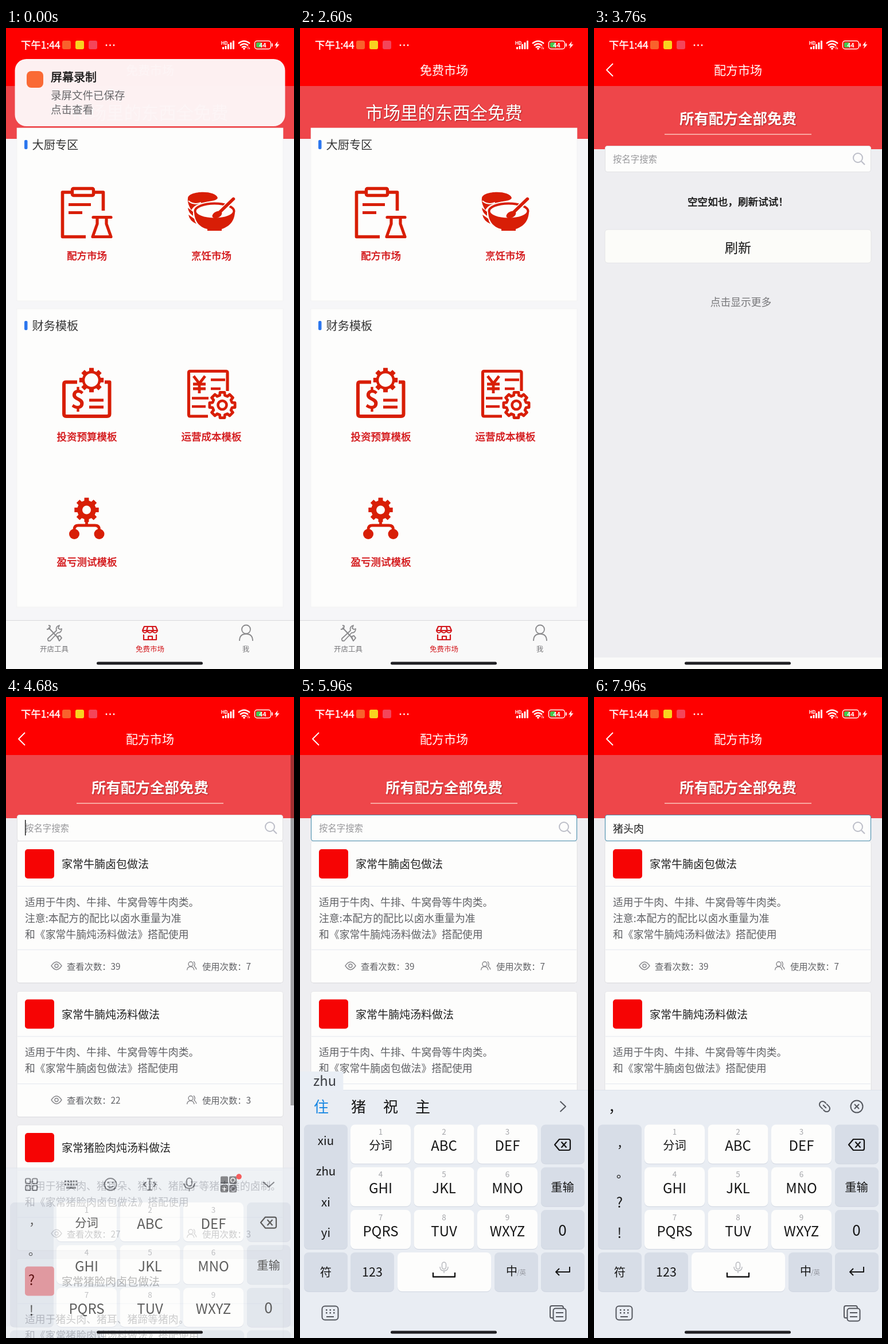
Write an HTML page that moves like this. It is 502x1116 px and loops after 8000 ms.

```html
<!DOCTYPE html>
<html lang="zh-CN">
<head>
<meta charset="utf-8">
<title>免费市场</title>
<style>
html, body { margin: 0; width: 100%; height: 100%; overflow: hidden; background: #fdfdfd; }
svg { display: block; width: 502px; height: 1116px; }
text { font-family: "Noto Sans CJK SC", "Noto Sans CJK", "Noto Sans", sans-serif; white-space: pre; }
</style>
</head>
<body>
<svg id="stage" viewBox="0 0 502 1116" xmlns="http://www.w3.org/2000/svg"></svg>
<script>
const RED = '#d81e06', LABEL = '#d20f12', GREY = '#5f6064', PAPER = '#fdfdfc';

// Drawing helpers
const text = (x, y, size, str, fill = '#222', more = '') =>
  `<text x="${x}" y="${y + .6}" font-size="${size}" fill="${fill}" ${more}>${str}</text>`;
const mid = (x, y, size, str, fill, more = '') => text(x, y, size, str, fill, `text-anchor="middle" ${more}`);
const medium = color => `stroke="${color}" stroke-width=".45"`;
const box = (x, y, w, h, fill, r = 0, more = '') =>
  `<rect x="${x}" y="${y}" width="${w}" height="${h}" rx="${r}" fill="${fill}" ${more}/>`;
const dot = (x, y, r, fill, more = '') => `<circle cx="${x}" cy="${y}" r="${r}" fill="${fill}" ${more}/>`;
const line = (d, color, w = 2, more = '') =>
  `<path d="${d}" fill="none" stroke="${color}" stroke-width="${w}" stroke-linejoin="round" ${more}/>`;
const fill = (d, color) => `<path d="${d}" fill="${color}"/>`;
const group = (id, body, more = '') => `<g id="${id}" ${more}>${body}</g>`;
const round = 'stroke-linecap="round"';

function gear(cx, cy, inner, outer, n = 8) {
  const pts = [], step = Math.PI * 2 / n;
  for (let i = 0; i < n; i++) {
    const a = i * step - Math.PI / 2;
    for (const [k, r] of [[-.32, inner], [-.23, outer], [.23, outer], [.32, inner]])
      pts.push((cx + r * Math.cos(a + k * step)).toFixed(1) + ' ' + (cy + r * Math.sin(a + k * step)).toFixed(1));
  }
  return 'M' + pts.join('L') + 'Z';
}

// Status bar
function statusBar() {
  const bars = [4, 6, 9, 12, 15].map((h, i) => box(377 + i * 4.5, 37 - h, 3, h, '#fff', 1)).join('');
  return text(26, 35.5, 17.4, '下午1:44', '#fff', medium('#fff'))
    + box(98, 22, 15, 15, '#f9622c', 3) + box(121, 22, 15, 15, '#f8d320', 3) + box(144, 22, 15, 15, '#f4455a', 3)
    + [175, 181.5, 188].map(x => dot(x, 30, 1.4, '#fff')).join('')
    + text(375, 28, 8, 'HD', '#fff', medium('#fff')) + bars
    + line('M405 27Q415 18.500 425 27M408 30.500Q415 24.500 422 30.500M411 34Q415 30.500 419 34', '#fff', 2.4)
    + dot(415, 36, 1.8, '#fff') + line('M422 32V37M424.500 34V37', '#fff', 1)
    + box(433.5, 22.5, 28, 14, 'none', 4, 'stroke="#fff" stroke-width="1.4"')
    + box(436, 25, 10, 9, '#43c84f', 2) + box(463, 26.5, 1.8, 6, '#fff', 1)
    + mid(447.5, 33, 10.5, '44', '#fff', 'font-weight="700"')
    + fill('M474 23L468 30.500H471.500L470 36L476.500 28.500H472.500Z', '#fff');
}

// Home page
const iconClipboard =
  line('M113 286H98.500V363.500H139M155 286H169.500V318', RED, 5.6)
  + box(115.5, 279.5, 37, 12, 'none', 2, `stroke="${RED}" stroke-width="5.400"`)
  + line('M109 307.500H148M109 321.500H133', RED, 5)
  + line('M152 329.500H183M159 330V341L151 363.500H183L175 341V330', RED, 5.2, round);

const iconBowl =
  fill('M317 296C319 283 366 282 369 296C366 302 352 301 340 305C330 308 326 312 323 317C319 310 316 304 317 296Z', RED)
  + line('M318 301Q327 309 340 304', PAPER, 2)
  + fill('M317 313L326 320V327Q318 322 317 313ZM318 325L328 332Q329 337 332 341Q320 336 318 325Z', RED)
  + fill('M328 319C328 340 341 348 351 350V353H376V350C389 346 399 336 399 319Z', RED)
  + `<ellipse cx="363.5" cy="319" rx="34" ry="13.500" fill="${PAPER}" stroke="${RED}" stroke-width="4"/>`
  + line('M397 297L371 323', PAPER, 9, round) + line('M396.500 297.500L370 323', RED, 5.4, round)
  + `<ellipse cx="368" cy="325" rx="9" ry="5.500" fill="${RED}" transform="rotate(-25 368 325)"/>`;

const iconBudget =
  line('M124 616.500H104Q101 616.500 101 620V672Q101 676 105 676H176Q180.500 676 180.500 672V616.500H172', RED, 6)
  + fill(gear(149, 613, 16.5, 21.5), RED) + dot(149, 613, 11.8, PAPER)
  + mid(125.5, 661.5, 44, '$', RED, 'font-weight="700"')
  + line('M145 648H170M145 660H170', RED, 5);

const iconCost =
  line('M352 676H321Q318.500 676 318.500 673V600Q318.500 597.500 321 597.500H383Q386 597.500 386 600V632', RED, 5.2)
  + line('M327 606L337 619L347 606M337 619V636M326 620H348M326 628H348', RED, 4.8)
  + line('M357 612.500H382M357 628H374M324 644.500H353M324 659H348', RED, 4.6)
  + `<path d="${gear(377, 656.5, 17.5, 22.5)}" fill="${PAPER}" stroke="${RED}" stroke-width="4.800" stroke-linejoin="round"/>`
  + dot(377, 656.5, 7.5, 'none', `stroke="${RED}" stroke-width="4.600"`);

const iconTest =
  fill(gear(140.5, 839, 16.5, 21.5), RED) + dot(140.5, 839, 7.5, PAPER)
  + line('M140.500 856V866M119 880V873Q119 866 126 866H155Q162.500 866 162.500 873V880', RED, 4.8)
  + dot(119, 881, 9, RED) + dot(162.5, 881, 9, RED);

function section(y, h, title) {
  return box(19, y, 464, h, PAPER, 0, 'stroke="#eeeeef" stroke-width=".6"')
    + box(32, y + 21, 5.5, 16, '#2b76ee', 2) + text(45.5, y + 36, 20.2, title, '#333');
}

function tabBar() {
  const grey = '#8a8a8c';
  return box(0, 1031, 502, 85, '#f9f9f9') + box(0, 1031, 502, 1, '#d9d9dc')
    + line('M74 1044L92 1063M71 1047L76 1046L77 1041L74 1040M89 1060L94 1058L97 1062L93 1067Z', grey, 2)
    + line('M73 1063L88 1049Q86 1042 93 1040L91 1045L94 1047L97 1046Q97 1053 90 1053L77 1067Q72 1068 73 1063Z', grey, 1.8)
    + line('M241 1042H261L264 1049H238ZM238 1050Q242 1056 246 1050Q251 1056 255 1050Q260 1056 264 1050M240 1056V1065H262V1056M248 1065V1059H255V1065M247 1042L245 1050M255 1042L257 1050', '#d3161b', 2.2)
    + dot(418.5, 1047, 7.5, 'none', `stroke="${grey}" stroke-width="1.800"`)
    + line('M407 1067Q407 1055 418.500 1055Q430 1055 430 1067', grey, 1.8)
    + mid(84, 1085, 12.5, '开店工具', '#77777a') + mid(251, 1085, 12.5, '免费市场', '#d3161b')
    + mid(418, 1085, 12.5, '我', '#77777a');
}

const label = (x, y, str) => mid(x, y, 17.5, str, LABEL, medium(LABEL));
const header = (title, bandEnd) =>
  box(0, 101, 502, bandEnd - 101, '#ee464a') + box(0, 0, 502, 101, '#fe0000') + mid(251, 80.5, 21, title, '#fff');
const shade = 'style="text-shadow:1px 1px 2px #a22"';

const home = box(0, 0, 502, 1116, '#f6f6f8') + header('免费市场', 193)
  + mid(251, 158, 30.4, '市场里的东西全免费', '#fff', shade)
  + section(174, 301, '大厨专区') + section(489, 519, '财务模板')
  + iconClipboard + iconBowl + iconBudget + iconCost + iconTest
  + label(141, 402, '配方市场') + label(358, 402, '烹饪市场')
  + label(141, 717, '投资预算模板') + label(358, 717, '运营成本模板') + label(141, 935, '盈亏测试模板')
  + tabBar();

// Recipe page
function card(y, title, lines, views, uses) {
  const foot = y + 133 + (lines.length - 2) * 28 + 27.5, base = foot + 34.5, height = foot - y + 58;
  const rule = v => box(20, v, 462, 1, '#e4e8f0');
  return box(18.5, y + 1, 465, height, '#dcdce0', 5)
    + box(19, y, 464, height, PAPER, 4, 'stroke="#e2e2e5" stroke-width=".8"')
    + box(33, y + 14, 51, 51, '#f60404', 5) + text(97, y + 46.5, 19, title, '#222')
    + rule(y + 78) + lines.map((s, i) => text(33, y + 112 + i * 28, 17.85, s, GREY)).join('') + rule(foot)
    + line(`M79 ${foot + 28.5}Q88 ${foot + 15} 97 ${foot + 28.5}Q88 ${foot + 42} 79 ${foot + 28.5}Z`, '#858589', 1.4)
    + dot(88, foot + 28.5, 3, 'none', 'stroke="#858589" stroke-width="1.400"')
    + dot(322, foot + 25.5, 4, 'none', 'stroke="#858589" stroke-width="1.400"')
    + line(`M315.500 ${foot + 36}Q316 ${foot + 30} 322 ${foot + 30}Q327 ${foot + 30} 328 ${foot + 36}M327 ${foot + 21}Q331 ${foot + 25} 328 ${foot + 29}Q331 ${foot + 31} 332 ${foot + 35}`, '#858589', 1.4)
    + text(106, base, 15.3, '查看次数：' + views, GREY) + text(342, base, 15.3, '使用次数：' + uses, GREY);
}

const beef = '适用于牛肉、牛排、牛窝骨等牛肉类。';
const cards =
  card(251, '家常牛腩卤包做法', [beef, '注意:本配方的配比以卤水重量为准', '和《家常牛腩炖汤料做法》搭配使用'], 39, 7)
  + card(512.5, '家常牛腩炖汤料做法', [beef, '和《家常牛腩卤包做法》搭配使用'], 22, 3)
  + card(745, '家常猪脸肉炖汤料做法', ['适用于猪头肉、猪耳朵、猪蹄、猪肚子等猪肉类的卤制。', '和《家常猪脸肉卤包做法》搭配使用'], 27, 3)
  + card(977.5, '家常猪脸肉卤包做法', ['适用于猪头肉、猪耳、猪蹄等猪肉。', '和《家常猪脸肉炖汤料做法》搭配使用'], 18, 2);

const empty = mid(251, 308, 17.6, '空空如也，刷新试试！', '#111', medium('#111'))
  + box(19, 351, 464, 58, '#fcfcf9', 5, 'stroke="#e0e0e2" stroke-width=".8"')
  + mid(251, 390, 23, '刷新', '#111') + mid(256, 483.5, 17.8, '点击显示更多', '#77777a');

const recipes = box(0, 0, 502, 1096, '#eeeef1') + box(0, 1096, 502, 20, '#fafaf9') + header('配方市场', 211)
  + line('M33 62L22 73L33 84', '#fff', 1.8)
  + mid(251, 166, 25.5, '所有配方全部免费', '#fff', `font-weight="700" ${shade}`)
  + box(123, 184.5, 256, 1.2, '#ffe4d8')
  + group('empty', empty) + group('cards', cards)
  + box(19.5, 205.5, 463, 45, PAPER, 4, 'id="field" stroke-width="1.100"')
  + text(33, 233.5, 15.4, '按名字搜索', '#98989b', 'id="hint"')
  + text(33, 235, 18, '猪头肉', '#222', 'id="query"')
  + dot(460, 226, 8, 'none', 'stroke="#bcbec8" stroke-width="2"') + line('M466 232L472 238', '#bcbec8', 2.2)
  + box(33, 214, 1.5, 27, '#222', 0, 'id="caret"')
  + box(496, 101, 6, 610, '#000', 0, 'id="scrollbar"');

// Keyboard
const INK = '#161616', SOFT = '#55585f', FN = '#d7dde7';
const key = (x, y, w, color, h = 68) =>
  box(x, y + 1, w, h, '#cfd5e0', 8) + box(x, y, w, h, color, 8);

function keyboard() {
  const names = ['分词', 'ABC', 'DEF', 'GHI', 'JKL', 'MNO', 'PQRS', 'TUV', 'WXYZ'];
  const letters = names.map((s, i) => {
    const x = 88 + i % 3 * 110.5, y = 744.5 + Math.floor(i / 3) * 74.3;
    return key(x, y, 105, PAPER) + mid(x + 52.5, y + 17, 13.5, i + 1, '#a5a6aa')
      + (i ? mid(x + 52.5, y + 45, 24, s, INK) : mid(x + 52.5, y + 42.5, 20.3, s, INK));
  }).join('');
  return box(0, 684, 502, 460, '#e9edf3') + box(0, 684, 502, 1, '#dde2ea')
    + key(7, 744.5, 76, FN, 216.5) + letters
    + [744.5, 818.8, 893.1, 967].map(y => key(420, y, 76, FN)).join('')
    + key(7, 967, 76, FN) + key(88, 967, 76, FN) + key(170, 967, 163, PAPER) + key(339, 967, 76, FN)
    + line('M452 770H468Q471 770 471 773V786Q471 789 468 789H452L444 779.500ZM455.500 774.500L464.500 784.500M464.500 774.500L455.500 784.500', INK, 2.2)
    + mid(457.5, 860.5, 20.3, '重输', INK) + mid(457.5, 937, 26, '0', INK)
    + mid(45, 1008, 20.3, '符', INK) + mid(126, 1008, 21.5, '123', INK)
    + text(359, 1006.5, 20, '中', INK) + text(378, 1005, 11.5, '/英', '#94979f')
    + line('M470 992V1001H446M452 995L446 1001L452 1007', INK, 2)
    + box(247.5, 984, 7, 12, 'none', 3.5, 'stroke="#b8babf" stroke-width="1.500"')
    + line('M244 992Q244 999 251 999Q258 999 258 992M251 999V1003', '#b8babf', 1.5)
    + line('M232 1002V1009.500H270V1002', INK, 2.4)
    + box(38.5, 1060.5, 28, 24, 'none', 5, `stroke="${SOFT}" stroke-width="2"`)
    + [0, 1, 2, 3, 4, 5].map(i => box(45 + i % 3 * 6.5, 1066 + (i > 2 ? 5 : 0), 2.5, 2.5, SOFT)).join('')
    + line('M46 1079H59', SOFT, 2)
    + line('M441 1081H438Q436 1081 436 1078V1063Q436 1060 439 1060H456Q459 1060 459 1064', SOFT, 2)
    + box(441.5, 1064.5, 22, 22, 'none', 4, `stroke="${SOFT}" stroke-width="2"`)
    + line('M446 1072H459M446 1079H459', SOFT, 2)
    + group('tools', toolbar()) + group('after', afterBar())
    + group('punct', text(40, 783, 21, '，', INK) + text(39, 835, 21, '。', INK)
      + mid(44.5, 888, 24, '?', INK) + mid(44.5, 941, 24, '!', INK))
    + group('typing', '');
}

function toolbar() {
  const grid = [0, 1, 2, 3].map(i =>
    box(34 + i % 2 * 12, 703 + (i > 1 ? 12 : 0), 8.5, 8.5, 'none', 2.4, `stroke="${SOFT}" stroke-width="2"`)).join('');
  const dots = Array.from({ length: 10 }, (_, i) =>
    box(102 + i % 5 * 4.8, 706 + (i > 4 ? 5.5 : 0), 3.2, 3.4, SOFT)).join('');
  return grid + dots + box(105, 717.5, 17, 3, SOFT)
    + dot(182, 713, 10.5, 'none', `stroke="${SOFT}" stroke-width="2"`)
    + dot(178, 710, 1.5, SOFT) + dot(186, 710, 1.5, SOFT) + line('M177 716Q182 721 187 716', SOFT, 2)
    + line('M250.500 703V723M246 703H255M246 723H255M244 709L240 713L244 717M257 709L261 713L257 717', SOFT, 2)
    + box(315, 702, 9, 14, 'none', 4.5, `stroke="${SOFT}" stroke-width="2"`)
    + line('M310 711Q311 720 319.500 720Q328 720 329 711M319.500 720V725', SOFT, 2)
    + [[374, 699], [389, 699], [374, 714], [389, 714]].map(([x, y]) => box(x, y, 13, 13, '#505257', 2)).join('')
    + dot(395.5, 705.5, 3.6, 'none', 'stroke="#fff" stroke-width="1.500"')
    + line('M376.500 720.500H384.500M380.500 716.500V724.500', '#fff', 1.6)
    + dot(396, 721, 4, 'none', 'stroke="#ccd" stroke-width="1.200"')
    + dot(406, 699.5, 4.8, '#f21414') + line('M448.500 709L458 717.500L467.500 709', SOFT, 2);
}

function afterBar() {
  return text(25, 722, 25, '，', INK)
    + line('M-2 -5.500H-5A5.500 5.500 0 0 0 -5 5.500H1M2 5.500H5A5.500 5.500 0 0 0 5 -5.500H-1M-4 0H4', SOFT, 2,
      'transform="translate(402 713) rotate(45)"')
    + dot(458, 713, 10.5, 'none', `stroke="${SOFT}" stroke-width="2"`)
    + line('M454 709L462 717M462 709L454 717', SOFT, 2);
}

// Each typing step: start, pinyin, candidates, left column
const SYL = 'xiu zhu xi yi';
const STEPS = [
  [5420, 'y', '一 有 要 我', 'w x y z'],
  [5640, 'yi', '一 以 已 西', 'xi yi zi w'],
  [5860, 'zhu', '住 猪 祝 主', SYL],
  [6080, "zhu't", '主题 主体 猪蹄 助听', SYL],
  [6290, "zhu'to", '主题 猪头 主体 助推', SYL],
  [6490, "zhu'tou", '猪头 煮透 主投 助投', SYL],
  [6690, "zhu'tou'r", '猪头肉 猪头三 猪头皮 助投器', SYL]
];
const COMMIT = 7240;

function typing([, pinyin, words, column]) {
  let x = 24;
  const list = words.split(' ').map((w, i) => {
    const out = text(x, 722.5, 26, w, i ? INK : '#1686e2');
    x += w.length * 26 + (i ? 30 : 39);
    return out;
  }).join('');
  return box(0, 652, pinyin.length * 10.8 + 43, 33, '#e9eef5') + text(23, 676.5, 23.8, pinyin, '#3c3f44')
    + `<g clip-path="url(#strip)">${list}</g>` + line('M453.500 704L463 713L453.500 722', SOFT, 2)
    + column.split(' ').map((s, i) => mid(45, 779.5 + i * 53.3, 20.5, s, INK)).join('');
}

const notice = box(15.5, 54, 471, 117, '#fdf5f6', 20, 'fill-opacity=".98"')
  + box(36, 75, 29, 29, '#fa6a35', 8)
  + text(78, 92, 20, '屏幕录制', '#161616', medium('#161616'))
  + text(78, 123, 18.5, '录屏文件已保存', '#68686b') + text(78, 148, 18.5, '点击查看', '#68686b');

document.getElementById('stage').innerHTML =
  '<defs><clipPath id="strip"><rect x="0" y="686" width="421" height="56"/></clipPath></defs>'
  + box(0, 0, 502, 1116, '#fff')
  + group('home', home) + group('recipes', recipes) + group('keys', keyboard())
  + group('notice', notice) + statusBar() + box(158, 1103.5, 185, 5, '#202024', 2.5);

// Motion
const $ = {};
for (const el of document.querySelectorAll('[id]')) $[el.id] = el;
const clamp = v => Math.min(1, Math.max(0, v));
const part = (t, start, length) => clamp((t - start) / length);
const show = (el, on) => el.setAttribute('display', on ? 'inline' : 'none');
const move = (el, x, y) => el.setAttribute('transform', `translate(${x.toFixed(2)} ${y.toFixed(2)})`);
const fade = (el, v) => el.setAttribute('opacity', v.toFixed(3));

// cubic-bezier(.25, .1, .25, 1)
function ease(x) {
  let lo = 0, hi = 1, u = x;
  for (let i = 0; i < 18; i++) {
    u = (lo + hi) / 2;
    const at = .75 * u * (1 - u) * (1 - u) + .75 * u * u * (1 - u) + u * u * u;
    if (at < x) lo = u; else hi = u;
  }
  return x <= 0 ? 0 : x >= 1 ? 1 : .3 * u * (1 - u) * (1 - u) + 3 * u * u * (1 - u) + u * u * u;
}

let lastStep = null;
function render(t) {
  const out = part(t, 2240, 320);
  move($.notice, 0, -36 * out * out);
  fade($.notice, 1 - out);

  const p = ease(part(t, 3408, 300));
  move($.home, -125.5 * p, 0);
  fade($.home, 1 - .4 * p);
  move($.recipes, Math.round(502 * (1 - p)), 0);
  show($.recipes, p > 0);
  const loaded = t >= 3880;
  show($.empty, !loaded);
  show($.cards, loaded);

  const rise = 1 - Math.pow(1 - part(t, 4540, 440), 3);
  move($.keys, 0, 432 * (1 - rise));
  fade($.keys, rise);
  show($.keys, rise > 0);
  fade($.scrollbar, .32 * part(t, 4520, 80) * (1 - part(t, 4900, 250)));

  const done = t >= COMMIT;
  show($.hint, !done);
  show($.query, done);
  $.field.setAttribute('stroke', t >= 4800 ? '#4b8fae' : '#e2e2e5');
  const since = t - (done ? COMMIT : 4400);
  show($.caret, since >= 0 && since % 1000 < 500);
  $.caret.setAttribute('x', done ? 87.5 : 33);

  const step = done ? null : STEPS.filter(s => t >= s[0]).pop() || null;
  if (step !== lastStep) {
    $.typing.innerHTML = step ? typing(step) : '';
    lastStep = step;
  }
  show($.tools, !step && !done);
  show($.after, done);
  show($.punct, !step);
}

const began = performance.now();
function tick() {
  render((performance.now() - began) % 8000);
  requestAnimationFrame(tick);
}
tick();
</script>
</body>
</html>
```
